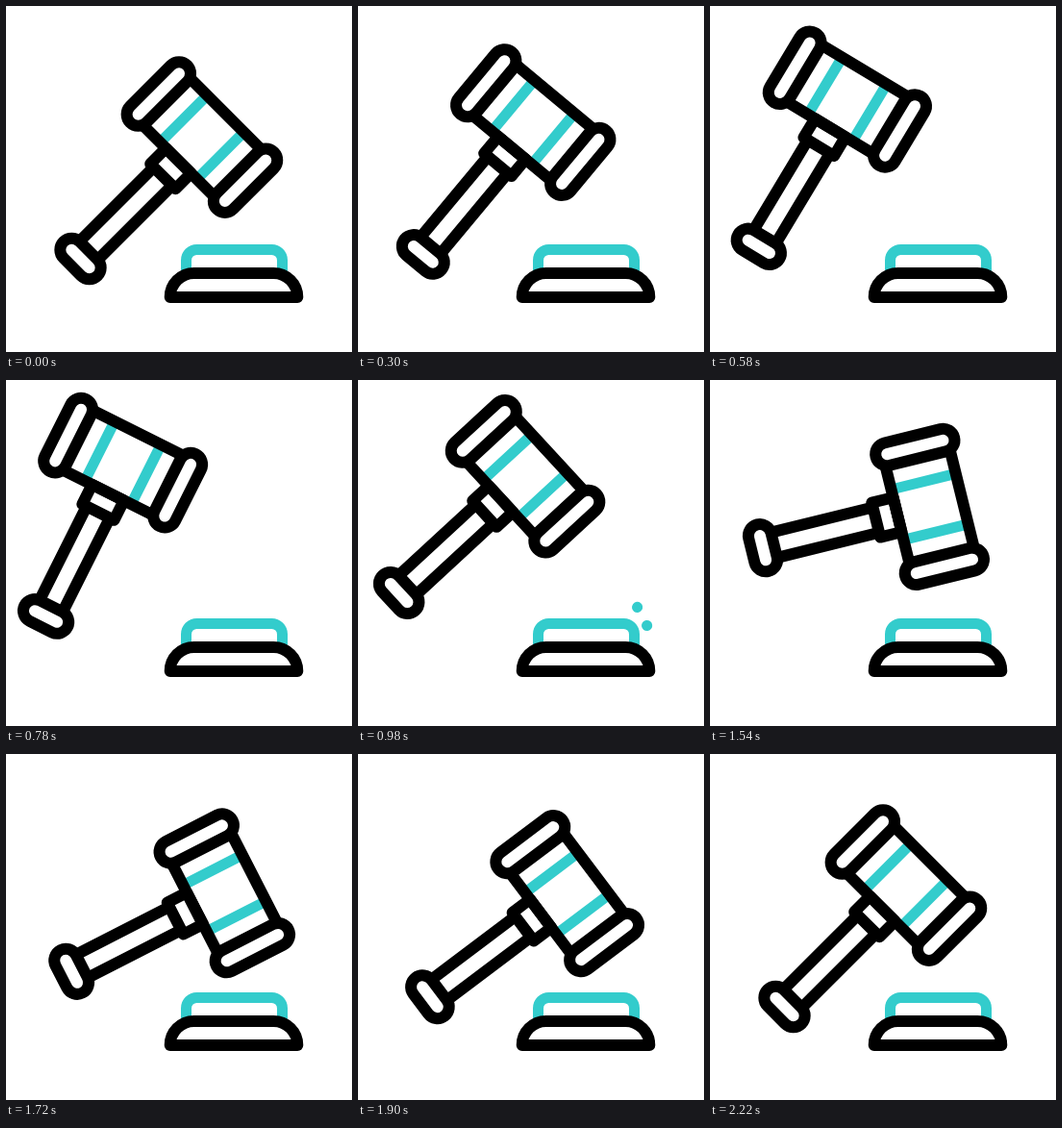
These frames come from a looping animation (360 by 360 pixels, 2.4 s). An HTML page:

```html
<!DOCTYPE html>
<html lang="en">
<head>
<meta charset="utf-8">
<title>Gavel</title>
<style>
  html, body { margin: 0; width: 100%; height: 100%; overflow: hidden; background: #fff; }
  svg { display: block; width: 100vw; height: 100vh; fill: none; stroke: #000; stroke-width: 12; stroke-linejoin: round; }
  .teal { stroke: #33cccc; stroke-width: 11; }
  .spark { stroke-linecap: round; }
  .solid { fill: #fff; }
</style>
</head>
<body>
<svg viewBox="0 0 360 360">
  <path class="teal" d="M187.5 278V264.5a11 11 0 0 1 11-11h78a11 11 0 0 1 11 11V278"/>
  <path class="solid" d="M170.7 303a25 25 0 0 1 25-25h82.6a25 25 0 0 1 25 25z"/>
  <path class="teal spark" pathLength="1" d="M290.5 236.5Q309 212 323 178"/>
  <path class="teal spark" pathLength="1" d="M300.5 255.5Q324 252 352.5 241"/>
  <g id="gavel">
    <path d="M12-13.5H121.3M12 13.5H121.3"/>
    <rect class="solid" x="121.3" y="-18.5" width="22.9" height="37"/>
    <rect class="solid" x="-12" y="-25" width="24" height="50" rx="12"/>
    <path class="teal" d="M144-27H213.5M144-27M144 27H213.5"/>
    <path d="M144.2-52V52M213.4-52V52"/>
    <rect class="solid" x="136.8" y="-75.8" width="84" height="24" rx="12"/>
    <rect class="solid" x="136.8" y="51.8" width="84" height="24" rx="12"/>
  </g>
</svg>
<script>
  const LOOP = 2400;
  const gavel = document.getElementById('gavel');
  const sparks = document.querySelectorAll('.spark');

  const progress = (t, from, to) => Math.min(1, Math.max(0, (t - from) / (to - from)));

  function ease(t, from, to) {
    const s = progress(t, from, to);
    return s * s * (3 - 2 * s);
  }

  const easeOut = (t, from, to, power) => 1 - (1 - progress(t, from, to)) ** power;

  // The handle end drifts while the gavel turns about it: raise, strike, return
  function pose(t) {
    const raise = ease(t, 0, 910), strike = ease(t, 880, 1174), back = easeOut(t, 1501, 2220, 2.85);
    return {
      x: 77.5 - 38 * raise + 11.5 * strike + 26.5 * back,
      y: 263 - 18 * raise - 86 * strike + 104 * back,
      turn: -45 - 19 * ease(t, 0, 875) + 59 * ease(t, 838, 1190) - 40 * easeOut(t, 1440, 2220, 1.8)
    };
  }

  function draw(t) {
    const { x, y, turn } = pose(t);
    gavel.setAttribute('transform', `translate(${x} ${y}) rotate(${turn})`);

    const head = ease(t, 960, 1500), tail = ease(t, 1115, 1500);
    for (const spark of sparks) {
      spark.style.visibility = t >= 960 && t < 1500 ? 'visible' : 'hidden';
      spark.style.strokeDasharray = `${Math.max(0.001, head - tail)} 2`;
      spark.style.strokeDashoffset = -tail;
    }
  }

  const start = performance.now();
  function tick() {
    draw((performance.now() - start) % LOOP);
    requestAnimationFrame(tick);
  }
  tick();
</script>
</body>
</html>
```
